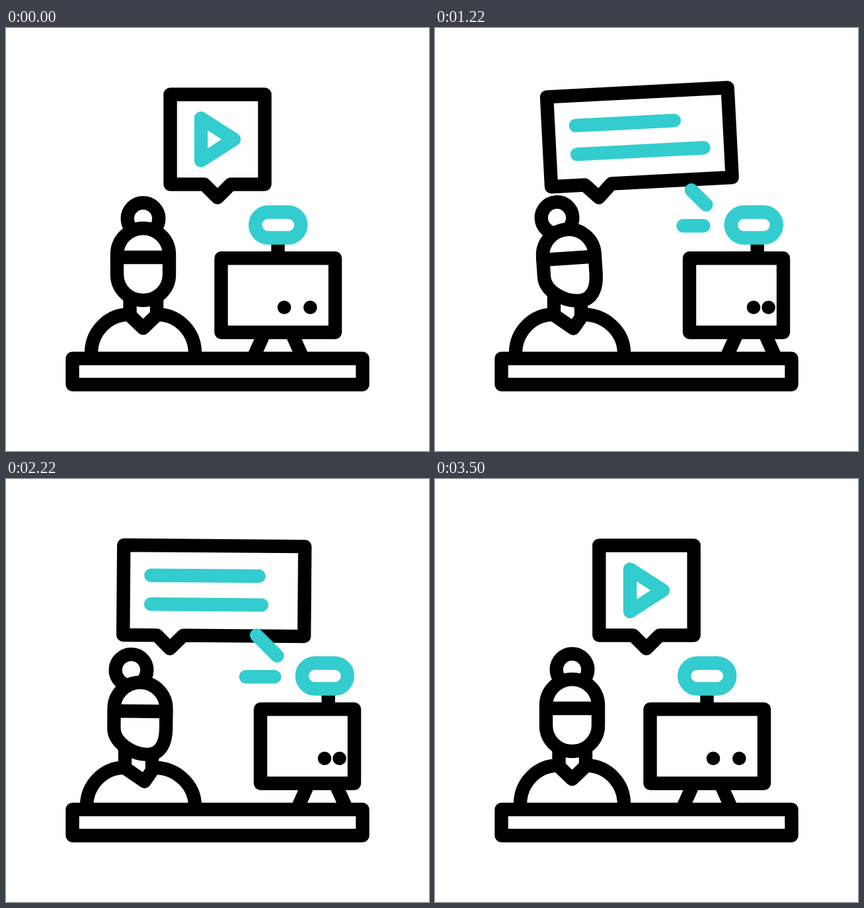
These frames come from a looping animation (640x640 px, 3600 ms). An HTML page with a canvas:

```html
<!DOCTYPE html>
<html lang="en">
<head>
<meta charset="utf-8">
<title>Video call desk</title>
<style>
  html, body { margin: 0; width: 100%; height: 100%; overflow: hidden; background: #fff; }
  canvas { display: block; width: 640px; height: 640px; }
</style>
</head>
<body>
<canvas id="stage" width="640" height="640"></canvas>
<script>
const ctx = document.getElementById('stage').getContext('2d');
const LOOP = 3600, STEP = 20;
const BLACK = '#000', TEAL = '#33cccf', WHITE = '#fff';

const mix = (a, b, k) => a + (b - a) * k;
const smooth = x => x * x * (3 - 2 * x);

// Eased keyframes given as [time, value] pairs.
function keys(t, ...frames) {
  if (t <= frames[0][0]) return frames[0][1];
  for (let i = 1; i < frames.length; i++) {
    const [t0, a] = frames[i - 1], [t1, b] = frames[i];
    if (t < t1) return mix(a, b, smooth((t - t0) / (t1 - t0)));
  }
  return frames[frames.length - 1][1];
}

// Alternates between a and b every 400 ms, from 1200 to 2800.
const swing = (a, b) => [1200, 1600, 2000, 2400, 2800].map((t, i) => [t, i % 2 ? b : a]);

function stroke(color, draw) {
  ctx.strokeStyle = color;
  ctx.beginPath();
  draw();
  ctx.stroke();
}

function poly(color, points, closed) {
  stroke(color, () => {
    points.forEach(([x, y]) => ctx.lineTo(x, y));
    if (closed) ctx.closePath();
  });
}

function dot(x, y, r) {
  ctx.fillStyle = BLACK;
  ctx.beginPath();
  ctx.arc(x, y, r, 0, Math.PI * 2);
  ctx.fill();
}

function rotateAround(x, y, degrees) {
  ctx.translate(x, y);
  ctx.rotate(degrees * Math.PI / 180);
  ctx.translate(-x, -y);
}

function drawBubble(t) {
  const open = keys(t, [480, 0], [992, 1], [3005, 1], [3515, 0]);
  const tilt = keys(t, [800, 0], ...swing(-3, 3), [3200, 0]);
  const left = mix(248.5, 177, open), right = mix(391.5, 451, open), tail = mix(320, 248, open);
  const top = 100.5, bottom = 236.5;

  ctx.save();
  rotateAround(248, 257, tilt);
  poly(BLACK, [
    [left, top], [right, top], [right, bottom], [tail + 20, bottom],
    [tail, 256.5], [tail - 20, bottom], [left, bottom]
  ], true);

  const first = keys(t, [800, 0], ...swing(149, 174), [3000, 149], [3250, 0]);
  const second = keys(t, [800, 0], ...swing(192, 150), [3200, 0]);
  [[146, first], [189.5, second]].forEach(([y, length]) => {
    if (length > 0.01) poly(TEAL, [[218.5, y], [218.5 + length, y]]);
  });
  ctx.restore();
}

function drawPlay(t) {
  const shown = keys(t, [0, 1], [400, 0], [3200, 0], [3500, 1]);
  if (shown < 0.001) return;
  const length = 64 + 2 * Math.hypot(50, 32);
  if (shown < 1) ctx.setLineDash([length * shown, length * 2]);
  poly(TEAL, [[295, 136.5], [345, 168.5], [295, 200.5]], true);
  ctx.setLineDash([]);
}

function drawWoman(t) {
  const turn = keys(t, [0, 0], [400, 1], [2800, 1], [3200, 0]);
  const nod = keys(t, [400, 0], [800, 1], ...swing(0, 1));
  const tilt = keys(t, [0, 0], [400, -3.8], [800, 3.8], ...swing(-3.8, 3.8), [3200, 0]);
  const at = (a, b) => mix(a, b, turn);

  ctx.save();
  ctx.translate(0, 5.6 * nod);

  // Shoulders and collar
  const shoulder = at(129, 122), neckLeft = at(187.5, 180), neckRight = at(228, 221);
  const collarLeft = at(186, 179), collarRight = at(229, 224);
  stroke(BLACK, () => {
    ctx.moveTo(shoulder, 502);
    ctx.lineTo(shoulder, 492);
    ctx.ellipse(collarLeft, 492, collarLeft - shoulder, 58.5, 0, Math.PI, Math.PI * 1.5);
    ctx.lineTo(at(207.5, 209.5), at(454, 454.5));
    ctx.lineTo(collarRight, 433.5);
    ctx.ellipse(collarRight, 492, 286 - collarRight, 58.5, 0, -Math.PI / 2, 0);
    ctx.lineTo(286, 502);
  });
  poly(BLACK, [[neckLeft, 400], [neckLeft, 433]]);
  poly(BLACK, [[neckRight, 400], [neckRight, 433]]);

  // Bun, face and headband
  rotateAround(at(207.5, 203), 352, tilt);
  stroke(BLACK, () => ctx.arc(at(207.5, 188.8), at(288.3, 286), 23.8, 0, Math.PI * 2));

  const left = at(168, 163.5), right = at(247, 242.3), brow = at(342.5, 344);
  const jaw = at(373, 374), chinX = at(207.5, 214), chinY = at(412, 413.5);
  ctx.fillStyle = WHITE;
  stroke(BLACK, () => {
    ctx.arc((left + right) / 2, brow, (right - left) / 2, Math.PI, 0);
    ctx.lineTo(right, jaw);
    ctx.bezierCurveTo(right, at(394.8, 395), at(229.3, 235), chinY, chinX, chinY);
    ctx.bezierCurveTo(at(185.7, 192), chinY, left, at(394.8, 396), left, jaw);
    ctx.closePath();
    ctx.fill();
  });
  const band = at(347, 348.2);
  poly(BLACK, [[left, band], [right, band]]);
  ctx.restore();
}

function drawMonitor(t) {
  const slide = keys(t, [0, 0], [400, 1], [3000, 1], [3400, 0]);
  const at = (a, b) => mix(a, b, slide);
  const left = at(325.5, 385), right = at(498, 527);

  const post = at(411.5, 487.7);
  poly(BLACK, [[post, 320], [post, 345]]);
  const foot = 66.5 * slide;
  poly(BLACK, [[390 + foot, 463.5], [375 + foot, 497]]);
  poly(BLACK, [[433 + foot, 463.5], [448 + foot, 497]]);

  stroke(BLACK, () => ctx.rect(left, 348.3, right - left, 112.2));
  dot(at(421, 482), 422.8, 10.3);
  dot(at(460.3, 504.6), 422.8, 10.3);
  stroke(TEAL, () => ctx.roundRect(at(377.2, 447.8), 278.5, 69, 39, 19.5));
}

function drawSignal(t) {
  if (t <= 400 || t >= 3200) return;
  // Each ray grows out of its near end and later shrinks to its far end.
  const far = keys(t, [400, -0.01], [800, 1], ...swing(0, 1));
  const ray = (x0, y0, xShort, yShort, xLong, yLong) => {
    const starting = t < 800;
    const x = mix(starting ? x0 : xShort, xLong, far);
    const y = mix(starting ? y0 : yShort, yLong, far);
    const near = keys(t, [2800, 0], [3200, 1]);
    poly(TEAL, [[mix(x0, x, near), mix(y0, y, near)], [x, y]]);
  };
  ray(406.3, 299.3, 375.5, 299.3, 353.5, 299.3);
  ray(410.3, 267.5, 388, 245.3, 372.5, 229.8);
}

function drawDesk() {
  ctx.fillStyle = WHITE;
  ctx.fillRect(100.5, 500, 439, 39.5);
  stroke(BLACK, () => ctx.rect(100.5, 500, 439, 39.5));
}

function render() {
  const t = Math.floor(performance.now() % LOOP / STEP) * STEP;
  ctx.fillStyle = WHITE;
  ctx.fillRect(0, 0, 640, 640);
  ctx.lineWidth = 20.4;
  ctx.lineCap = ctx.lineJoin = 'round';
  drawBubble(t);
  drawPlay(t);
  drawWoman(t);
  drawMonitor(t);
  drawSignal(t);
  drawDesk();
  requestAnimationFrame(render);
}
render();
</script>
</body>
</html>
```
